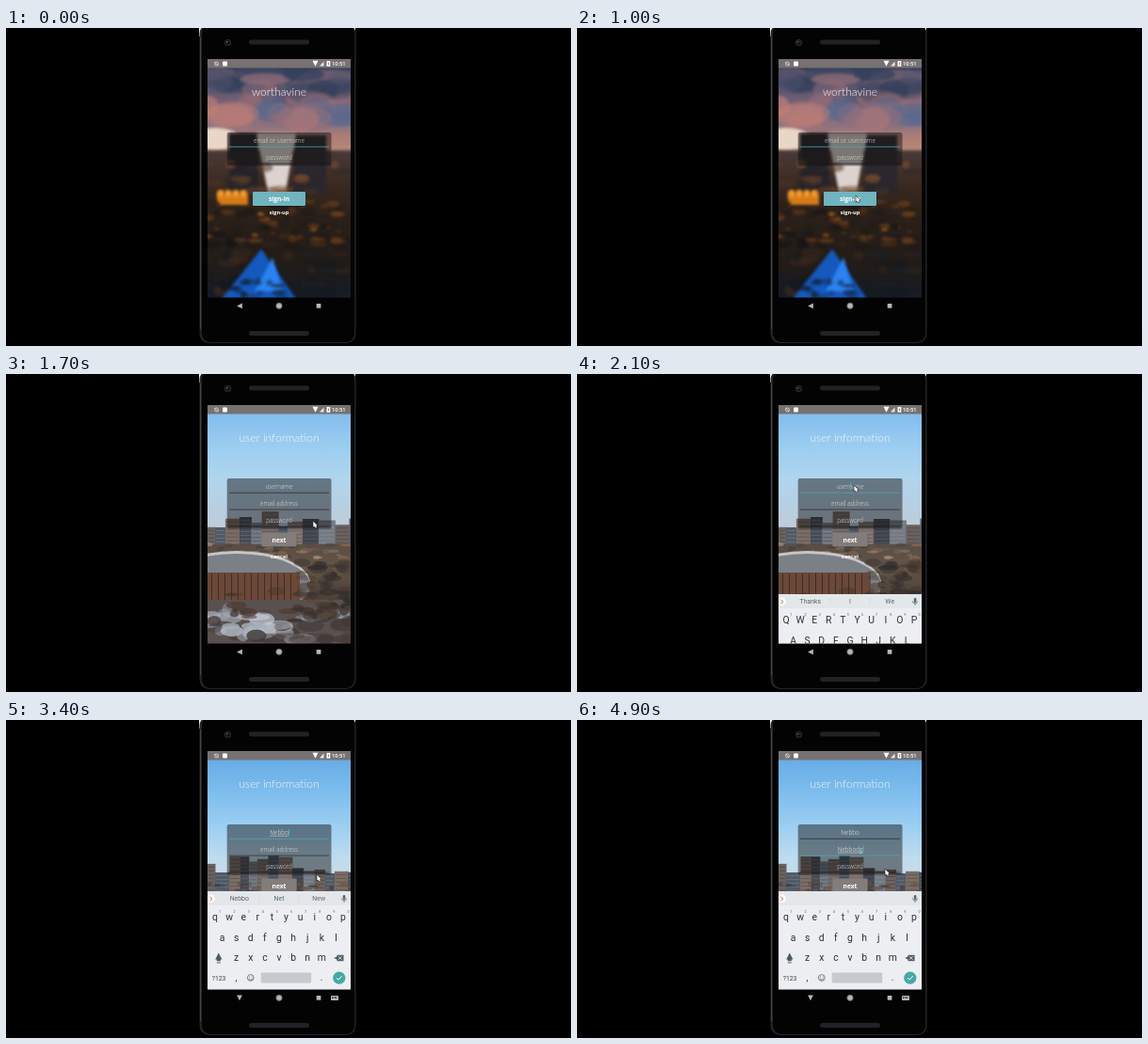
Recreate the animation shown at these times as an HTML page with a canvas. Size 600 by 338 pixels, loop 5000 ms.

```html
<!DOCTYPE html>
<html lang="en">
<head>
<meta charset="utf-8">
<title>Sign-up demo</title>
<style>
html, body { margin: 0; width: 100%; height: 100%; overflow: hidden; background: #000; }
canvas { display: block; width: 600px; height: 338px; }
</style>
</head>
<body>
<canvas id="stage" width="600" height="338"></canvas>
<script>
const LOOP = 5000, STEP = 100;
const LEFT = 214, TOP = 42, WIDTH = 152, BOTTOM = 286.5, MID = 290;
const TEAL = '#46a8a6', INK = '#3a444b', SOFT = '#59666e', ICON = '#b7b7b7';
const LATO = 'Lato, sans-serif', OPEN = '"Open Sans", sans-serif', ROBOTO = 'Roboto, sans-serif';
const APP = 'worthavine', USER = 'Nebbo', MAIL = USER + 'dg';
let c = document.getElementById('stage').getContext('2d');

function rect(x, y, w, h, fill) {
  c.fillStyle = fill;
  c.fillRect(x, y, w, h);
}
function round(x, y, w, h, r, fill) {
  c.fillStyle = fill;
  c.beginPath();
  c.roundRect(x, y, w, h, r);
  c.fill();
}
function oval(x, y, rx, ry, fill) {
  c.fillStyle = fill;
  c.beginPath();
  c.ellipse(x, y, rx, ry, 0, 0, 7);
  c.fill();
}
function dot(x, y, r, fill) {
  oval(x, y, r, r, fill);
}
function arc(x, y, r, color, from = 0, to = 7) {
  c.strokeStyle = color;
  c.lineWidth = .8;
  c.beginPath();
  c.arc(x, y, r, from, to);
  c.stroke();
}
function poly(fill, ...p) {
  c.fillStyle = fill;
  c.beginPath();
  for (let i = 0; i < p.length; i += 2) c.lineTo(p[i], p[i + 1]);
  c.closePath();
  c.fill();
}
function line(color, width, ...p) {
  c.strokeStyle = color;
  c.lineWidth = width;
  c.beginPath();
  for (let i = 0; i < p.length; i += 2) c.lineTo(p[i], p[i + 1]);
  c.stroke();
}
// Triangle pointing along the given quarter turn (0 is right)
function tri(x, y, r, turn, fill) {
  c.save();
  c.translate(x, y);
  c.rotate(turn * Math.PI / 2);
  poly(fill, r, 0, -r, -r, -r, r);
  c.restore();
}
function text(s, x, y, font, fill) {
  c.font = font;
  c.fillStyle = fill;
  c.textAlign = 'center';
  c.fillText(s, x, y);
}
function fade(y0, y1, ...colors) {
  const g = c.createLinearGradient(0, y0, 0, y1);
  colors.forEach((k, i) => g.addColorStop(i / (colors.length - 1), k));
  return g;
}
function random(seed) {
  return () => (seed = (seed * 16807) % 2147483647) / 2147483647;
}

// Paint a backdrop once, softened, on its own layer
function layer(blur, paint) {
  const cv = document.createElement('canvas'), main = c;
  cv.width = 600;
  cv.height = 338;
  c = cv.getContext('2d');
  c.filter = `blur(${blur}px)`;
  paint();
  c = main;
  return cv;
}
function specks(n, seed, y0, y1, size, colors, x0 = LEFT, x1 = LEFT + WIDTH) {
  const r = random(seed);
  for (let i = 0; i < n; i++) {
    const x = x0 + r() * (x1 - x0), y = y0 + r() * (y1 - y0);
    c.globalAlpha = .3 + r() * .5;
    oval(x, y, size * (.4 + r()), size * (.2 + r() * .4), colors[i % colors.length]);
  }
  c.globalAlpha = 1;
}
function skyline(seed, base, high, colors) {
  const r = random(seed);
  for (let x = LEFT, i = 0; x < LEFT + WIDTH; i++) {
    const w = 8 + r() * 10, y = high + r() * 20;
    rect(x, y, w + .5, base - y, colors[i % colors.length]);
    for (let j = y + 3; j < base; j += 4) rect(x + 1, j, w - 2, 1, i % 2 ? '#fff2' : '#0003');
    x += w;
  }
}

const dusk = layer(1.8, () => {
  rect(200, 30, 180, 270, fade(42, 132, '#333f5c', '#4b4c66', '#896a77', '#706e88', '#aa7b76', '#b98c78'));
  specks(36, 23, 46, 78, 22, ['#34415d', '#5b5870', '#8d6a76']);
  specks(18, 9, 78, 106, 22, ['#bd7d76', '#56698f', '#94707b']);
  oval(222, 118, 26, 12, '#e9d6c6');
  rect(200, 130, 180, 170, fade(130, 288, '#493a38', '#38281f', '#291f19', '#221c18', '#141a24'));
  rect(237, 112, 31, 62, '#262328');
  rect(306, 114, 34, 62, '#2b282d');
  poly('#dcd2cf', 266, 112, 308, 112, 297, 174, 278, 174);
  specks(22, 31, 142, 178, 9, ['#5b3c2b', '#2a262a', '#75492d']);
  rect(224, 177, 33, 11, '#d57a19');
  for (let x = 228; x < 256; x += 8) dot(x, 176, 4, '#f29a2c');
  specks(80, 71, 184, 234, 7, ['#77431c', '#151516', '#302318', '#1c1917']);
  specks(14, 14, 186, 228, 3, ['#d17a28']);
  specks(34, 19, 238, 288, 9, ['#121a25', '#3a291f', '#1b2029']);
  poly('#1559bd', 229, 288, 271, 235, 308, 288);
  poly('#2b82f0', 264, 280, 283, 244, 294, 280);
  specks(18, 33, 268, 288, 6, ['#101a2a', '#1a2c44'], 230, 306);
});

const STONE = ['#6b625f', '#515a66', '#7b6d66', '#474b54', '#737982'];
const city = layer(.6, () => {
  rect(200, 30, 180, 160, fade(42, 180, '#82bcec', '#9bcdf1', '#afd5ee', '#b9cedf', '#c5ccd4'));
  skyline(52, 194, 146, STONE);
  rect(200, 181, 180, 110, fade(181, 286, '#584d46', '#655547', '#4b4038', '#4a4340', '#686a70'));
  specks(60, 5, 181, 200, 5, ['#8a6850', '#3c3b38', '#a48a76', '#5d5545']);
  oval(245, 222, 78, 34, '#c7c6c5');
  oval(245, 225, 78, 34, '#7b7f86');
  rect(200, 211, 112, 34, '#6b4838');
  for (let x = 218; x < 308; x += 7) rect(x, 212, 1, 30, '#3d2c27');
  rect(200, 240, 180, 50, '#59514f');
  specks(50, 41, 250, 284, 13, ['#a7b0bd', '#463a36', '#c4cbd6', '#3b3534']);
  specks(60, 12, 200, 256, 8, ['#3d332f', '#584839', '#2f2d2d'], 314);
  specks(26, 77, 230, 262, 8, ['#3b2f2b', '#4f3b31'], 240);
});
const cityTop = layer(.6, () => {
  rect(200, 30, 180, 160, fade(42, 182, '#67ade6', '#7ebded', '#9bcef2', '#bfdcef', '#ced9e2'));
  skyline(87, 186, 144, STONE);
  specks(28, 8, 174, 184, 5, ['#4b3a32', '#6f5141', '#393a40']);
});

function phone() {
  rect(0, 0, 600, 338, '#000');
  rect(205, 0, 166, 9, '#eee');
  round(205.5, -4, 166, 339, 10, '#242426');
  round(208, -4, 162, 338, 9, '#030304');
  rect(206, 10, 1, 310, '#444');
  for (const y of [12.5, 322]) round(258, y, 64, 5, 2.5, '#222224');
  dot(235.5, 15.5, 3.6, '#2b2b2d');
  dot(235.5, 15.5, 2.2, '#0b0b0d');
  dot(235, 15, .9, '#576064');
}

function statusBar() {
  rect(LEFT, 33, WIDTH, 9.5, '#777170');
  arc(223.5, 38, 2, '#ddd');
  line('#ddd', .8, 221.5, 36, 225.5, 40);
  round(230, 35.5, 5, 5, 1, '#fff');
  tri(328.5, 37.8, 3, 1, '#fff');
  poly('#e8e8e8', 333, 40.5, 337.5, 40.5, 337.5, 35.5);
  round(340.5, 35, 3.8, 5.8, .5, '#fff');
  rect(342, 36.5, .9, 2.8, '#777');
  text('10:51', 353.3, 40.2, '500 5.8px ' + ROBOTO, '#fff');
}

function navBar(typing) {
  tri(248, 295.4, 2.9, typing ? 1 : 2, ICON);
  dot(MID, 295.3, 3.4, '#858585');
  dot(MID, 295.3, 2.4, ICON);
  rect(329.7, 293, 4.7, 4.7, ICON);
  if (!typing) return;
  round(345, 293, 8, 5, .8, ICON);
  for (let x = 346; x < 352; x += 1.5) rect(x, 294, .7, 2, '#222');
}

function field(label, row, focused, value, t) {
  const y = 119.5 + row * 17.9;
  rect(237, y + 6.3, 106, .8, focused ? '#4fa5ac' : 'rgba(25,25,28,.75)');
  text(value || label, MID, y + 2.2, '300 6.4px ' + OPEN, value ? '#f0f0f0' : '#dedede');
  if (!focused) return;
  const w = value ? c.measureText(value).width / 2 : 0;
  rect(MID - w, y + 3.4, 2 * w, .5, '#ddd');
  if (value || t % 1000 < 500) rect(MID + w + .3, y - 3.5, .9, 7, '#43c0bd');
}
function screen(title, rows) {
  text(title, MID, 72, '300 12px ' + LATO, '#f5f7f9');
  round(234.7, 111, 110.8, rows * 17.8, 2, 'rgba(18,18,18,.48)');
}
function button(label, y, w, fill) {
  rect(MID - w / 2 + .5, y + 1, w, 15, 'rgba(0,0,0,.3)');
  round(MID - w / 2, y, w, 15, 1, fill);
  text(label, MID, y + 10, 'bold 6.7px ' + OPEN, '#fff');
}
function link(label, y) {
  text(label, MID, y, 'bold 5.6px ' + OPEN, '#fff');
}

function signIn() {
  c.drawImage(dusk, 0, 0);
  screen(APP, 2);
  field('email or username', 0, true, '', LOOP - 1);
  field('password', 1, false);
  button('sign-in', 174, 56, '#6fb4bf');
  link('sign-up', 198.2);
}

function typed(word, t, start, pace) {
  return word.slice(0, Math.max(0, Math.floor((t - start) / pace)));
}
function signUp(t) {
  const plain = t < 1500, typing = t >= 2200, onMail = t >= 3800;
  const name = typed(USER, t, 2400, 200), mail = typed(MAIL, t, 4200, 100);
  if (plain) rect(LEFT, TOP, WIDTH, BOTTOM - TOP, '#e6e5eb');
  else c.drawImage(typing ? cityTop : city, 0, 0);
  screen('user information', 3);
  field('username', 0, t >= 2100 && !onMail, name, t);
  field('email address', 1, onMail, mail, t);
  field('password', 2, false);
  button('next', 168.6, 37.5, plain ? '#7f7f80' : '#827d7b');
  link('cancel', 196.3);
  if (t < 2100) return;
  c.save();
  c.translate(0, typing ? 0 : 52);
  keyboard(onMail ? mail : name, onMail);
  c.restore();
}

function hints(word, onMail) {
  if (!word) return ['Thanks', 'I', 'We'];
  return onMail ? [] : [word, 'Net', 'New'];
}

function keyboard(word, onMail) {
  const upper = !word, shift = upper ? TEAL : '#4c5b64';
  rect(LEFT, 182, WIDTH, 105, '#eceef2');
  rect(LEFT, 182, WIDTH, 15, '#e4e7ea');
  dot(217.5, 190, 4.4, '#fff');
  line('#bf5b4c', 1, 216.5, 187.8, 218.7, 190, 216.5, 192.2);
  hints(word, onMail).forEach((s, i) => {
    text(s, MID + (i - 1) * 42.2, 192.4, '6.9px ' + ROBOTO, SOFT);
    if (i) rect(226.4 + i * 42.2, 186, .5, 7, '#cdd1d5');
  });
  round(357.8, 186, 2.5, 5, 1.2, SOFT);
  arc(359, 189.5, 2.5, SOFT, 0, Math.PI);
  rect(358.7, 192, .7, 2, SOFT);

  ['qwertyuiop', 'asdfghjkl', 'zxcvbnm'].forEach((keys, row) => {
    [...keys].forEach((k, i) => {
      const x = MID + (i - (keys.length - 1) / 2) * 15.12;
      text(upper ? k.toUpperCase() : k, x, 212.6 + row * 21.9, '10.4px ' + ROBOTO, '#293238');
      if (!row) text((i + 1) % 10, x + 5.5, 204.6, '3.8px ' + ROBOTO, SOFT);
    });
  });
  tri(225.8, 251, 3.6, 3, shift);
  rect(223.8, 253, 4, 3.3, shift);
  rect(223.8, 257.5, 4, .9, shift);
  tri(351, 253, 2.8, 2, '#4c5b64');
  rect(351.5, 249.8, 7, 6.4, '#4c5b64');
  line('#fff', .8, 353, 251.2, 356.6, 254.8);
  line('#fff', .8, 356.6, 251.2, 353, 254.8);

  text('?123', 226, 276.5, '6.8px ' + ROBOTO, INK);
  text(',', 244.5, 276.5, '10px ' + ROBOTO, INK);
  text('.', 335, 276.5, '10px ' + ROBOTO, INK);
  arc(259.8, 274, 3.4, SOFT);
  arc(259.8, 274.4, 1.8, SOFT, .2, 2.94);
  for (const dx of [-1.3, 1.3]) dot(259.8 + dx, 273, .55, SOFT);
  round(270.7, 268.6, 53.5, 10.8, 1, '#c6cacf');
  dot(353.8, 274.2, 6.6, TEAL);
  line('#fff', 1, 351, 274.2, 353, 276.2, 356.7, 272.2);
}

// Each move: start, length, end point
const MOVES = [[600, 400, 296, 178], [1000, 200, 287, 195], [1400, 300, 326, 156], [1700, 300, 294, 118],
  [2200, 300, 330, 164], [3500, 300, 294, 141], [4000, 400, 327, 158]];
function pointer(t) {
  if (t < MOVES[0][0]) return;
  let x = 348, y = 232;
  for (const [start, length, x1, y1] of MOVES) {
    const u = Math.min(1, Math.max(0, (t - start) / length)), e = u * u * (3 - 2 * u);
    x += (x1 - x) * e;
    y += (y1 - y) * e;
  }
  c.save();
  c.translate(x, y);
  line('#222', 2.6, 2, 4, 3.5, 7.5);
  poly('#fff', 0, 0, 0, 7, 5, 5);
  line('#222', .7, 0, 0, 0, 7, 5, 5, 0, 0);
  line('#fff', 1.4, 1.9, 4, 3.3, 7.2);
  c.restore();
}

function draw(now) {
  const t = Math.floor((now % LOOP) / STEP) * STEP;
  phone();
  c.save();
  c.beginPath();
  c.rect(LEFT, 33, WIDTH, BOTTOM - 33);
  c.clip();
  if (t < 1300) signIn();
  else signUp(t);
  statusBar();
  c.restore();
  navBar(t >= 2200);
  pointer(t);
}

let start;
function tick(now) {
  start ??= now;
  draw(now - start);
  requestAnimationFrame(tick);
}
requestAnimationFrame(tick);
</script>
</body>
</html>
```
